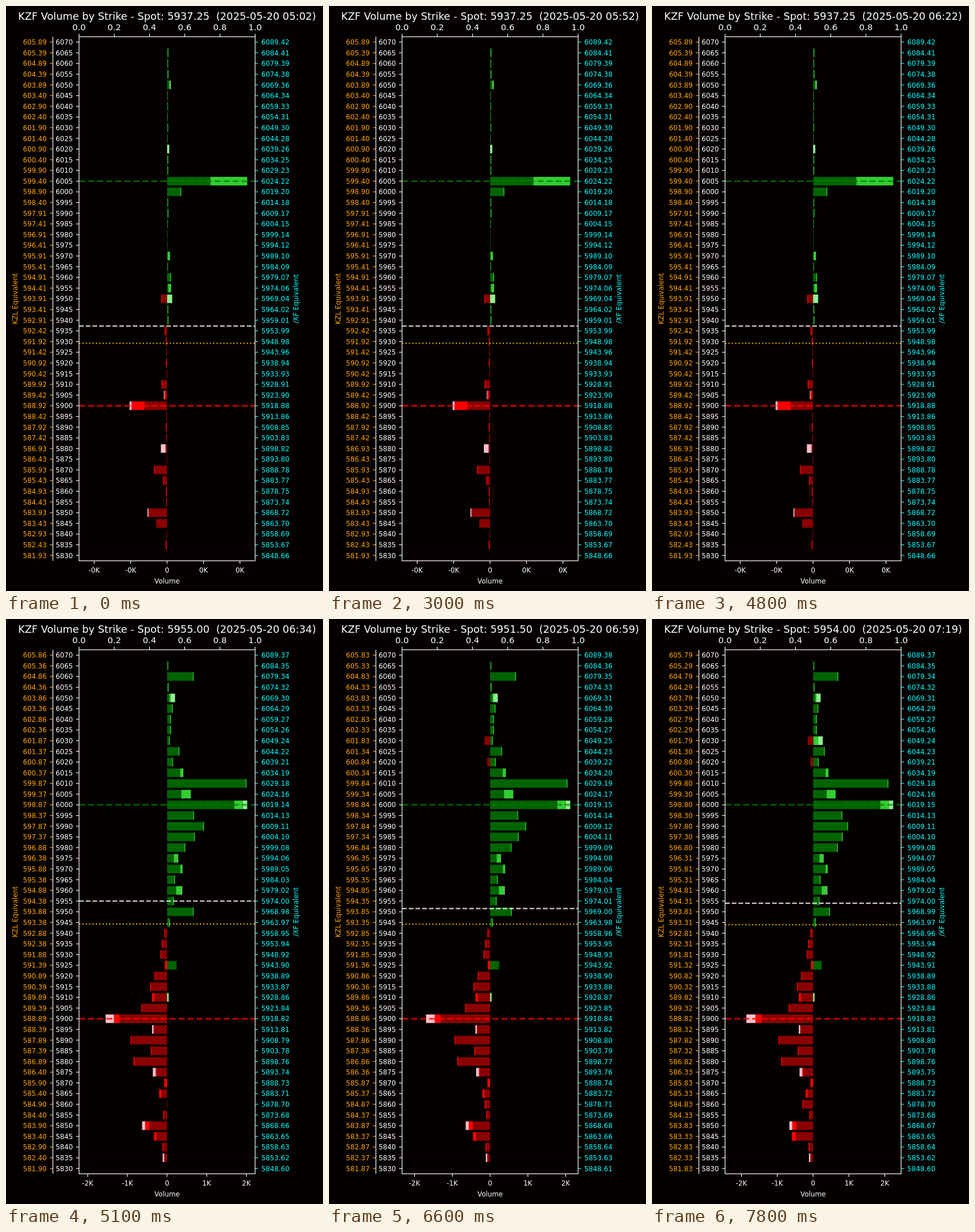
An HTML page for the animation above (8 s loop, 551x1017 px).

```html
<!DOCTYPE html>
<html lang="en">
<head>
<meta charset="utf-8">
<title>Volume by Strike</title>
<style>
  html, body { margin: 0; width: 100%; height: 100%; overflow: hidden; background: #050000; }
  svg { display: block; width: 551px; height: 1017px; }
  text { font: 11.83px "DejaVu Sans", Verdana, sans-serif; fill: #fff; white-space: pre; }
  .mid { text-anchor: middle; }
  .end { text-anchor: end; }
  .title { font-size: 17.75px; }
  .scale { font-size: 14.8px; }
  .etf { fill: #ffa500; }
  .fut { fill: #0ff; }
</style>
</head>
<body>
<svg id="stage" viewBox="0 0 551 1017"></svg>
<script>
const LOOP = 8000, STEP = 300, LAST = 26, OPEN = 17;
const LEFT = 127, RIGHT = 433, TOP = 53.5, BOTTOM = 964.5, ZERO = 280;
const HIGH = 6070, ROWS = 49, PITCH = (BOTTOM - TOP) / ROWS;
const LONGEST = 139.3, TICK = 100;
const GREENS = ["#006400", "#32cd32", "#90ee90"];
const REDS = ["#8b0000", "#ff0000", "#ffc0cb"];

// A bar is [strike, signed volume, dark share, bright share]; the rest is pale.
const earlyTrades = [
  [6050, 10, .6, .8], [6020, 6, 0, 0], [6005, 220, .54, 1], [6000, 39], [5970, 8, .2, 1],
  [5960, 11], [5955, 11, .3, 1], [5950, 14, 0, 0], [5950, -16], [5935, -7], [5910, -15],
  [5905, -9, .3, .8], [5900, -103, .6, .95], [5880, -17, .24, .24], [5870, -36],
  [5865, -11], [5850, -54, .93, .95], [5845, -30, 1, 1]
];
// Volume after the open, one value per strike from 6065 down.
const openVolume = [
  3, 67, 4, 20, 14, 10, 10, 7, 31, 15, 41, 200, 60, 202, 68, 93, 70, 46, 28, 39, 20, 38, 17, 67, 7,
  -7, -13, -17, -6, -32, -43, -38, -65, -155, -38, -92, -41, -85, -36, -7, -20, -1, -10, -63, -33, -12, -11
];
const shares = {
  6050: [.3, .45], 6015: [.8, 1], 6005: [.6, 1], 6000: [.84, .945], 5975: [.6, .94], 5970: [.85, 1],
  5960: [.6, .95], 5925: [0, 1], 5910: [.83, 1], 5900: [.77, .865], 5895: [.88, .9], 5875: [.73, .8],
  5870: [0, 1], 5865: [.7, 1], 5850: [.7, .88], 5845: [.8, 1], 5835: [.67, .67]
};
const growth = { 6000: 1.107, 5995: 1.2, 5985: 1.18, 5980: 1.5, 5950: .7, 5900: 1.2, 5860: 30, 5845: 1.8 };
// Trades on the other side, each with its first step.
const hedges = [
  [18, [6030, -15, 1, 1]], [18, [6020, -8, 1, 1]], [OPEN, [5925, 24, 1, 1]],
  [OPEN, [5910, 4, 0, 0]], [24, [6030, 27, .06, .53]]
];
const prices = [
  { at: OPEN, spot: 5955, etf: 594.38 }, { at: 19, spot: 5952.75, etf: 594.16 },
  { at: 22, spot: 5951.5, etf: 594 }, { at: LAST, spot: 5954, etf: 594.21 }
];

const stage = document.getElementById("stage");
const strikes = Array.from({ length: ROWS }, (_, i) => HIGH - 5 * i);
const yOf = strike => TOP + ((HIGH - strike) / 5 + .5) * PITCH;
const mix = (a, b, k) => a + (b - a) * k;
const noise = n => { const v = Math.abs(Math.sin(n * 12.9898) * 43758.5453); return v - Math.floor(v); };

function add(parent, tag, attrs, content) {
  const el = document.createElementNS("http://www.w3.org/2000/svg", tag);
  for (const name in attrs) el.setAttribute(name, attrs[name]);
  if (content !== undefined) el.textContent = content;
  parent.append(el);
  return el;
}
const label = (x, y, cls, content, more) => add(stage, "text", { x, y, class: cls, ...more }, content);
const line = (x1, y1, x2, y2, stroke = "#fff", more) =>
  add(stage, "line", { x1, y1, x2, y2, stroke, "stroke-width": 1.2, ...more });
const across = (color, width, dash, opacity) => line(LEFT, 0, RIGHT, 0, color, {
  "stroke-width": width, "stroke-dasharray": dash.map(d => d * width).join(" "), "stroke-opacity": opacity
});
function moveTo(el, strike) {
  for (const end of ["y1", "y2"]) el.setAttribute(end, yOf(strike));
}

line(LEFT, yOf(5835), RIGHT, yOf(5835), "#1c0000", { "stroke-width": 1 });
const barLayer = add(stage, "g", {});
const DASH = [3.7, 1.6];
const spotLine = across("#fff", 2.2, DASH, .8);
const flipLine = across("#ffd700", 2.2, [1, 1.65], .8);
const callLine = across("#008000", 2.96, DASH, .7);
const putLine = across("#ff0000", 2.96, DASH, .75);

const rows = strikes.map(strike => {
  const y = yOf(strike), base = y + 4.4;
  line(LEFT - 5.2, y, LEFT, y);
  line(76.3, y, 81.5, y, "#ffa500");
  line(RIGHT, y, RIGHT + 5.2, y, "#0ff");
  label(116.4, base, "end", strike);
  return { strike, etf: label(70.9, base, "etf end"), fut: label(443.8, base, "fut") };
});
for (let i = 0; i <= 5; i++) {
  const x = mix(LEFT, RIGHT, i / 5);
  line(x, TOP - 5.2, x, TOP);
  label(x, 41.6, "scale mid", (i / 5).toFixed(1));
}
const ticks = [-2, -1, 0, 1, 2].map(n => ({
  n, mark: line(ZERO, BOTTOM, ZERO, BOTTOM + 5.2), text: label(ZERO, 985.2, "mid")
}));
add(stage, "rect", { x: LEFT, y: TOP, width: RIGHT - LEFT, height: BOTTOM - TOP,
  fill: "none", stroke: "#fff", "stroke-width": 1.2 });
line(81.5, TOP, 81.5, BOTTOM);

const title = label(ZERO, 24.3, "title mid");
label(ZERO, 1003.8, "mid", "Volume");
label(0, 0, "etf mid", "KZL Equivalent", { transform: "translate(19.5 509) rotate(-90)" });
label(0, 0, "fut mid", "/XF Equivalent", { transform: "translate(507.5 509) rotate(-90)" });

function earlyState() {
  const spot = 5937.25;
  const quiet = strikes.slice(1, -1)
    .filter(strike => !earlyTrades.some(bar => bar[0] === strike))
    .map(strike => [strike, mix(1, 4, noise(strike)) * Math.sign(strike - spot)]);
  return { spot, etf: 592.64, flip: 5929.2, bars: [...earlyTrades, ...quiet] };
}

function liveState(step) {
  const i = Math.max(1, prices.findIndex(price => price.at >= step));
  const a = prices[i - 1], b = prices[i], k = (step - a.at) / (b.at - a.at);
  const traded = ((step - OPEN) / (LAST - OPEN)) ** 1.3;
  const bars = openVolume.map((volume, n) => {
    const strike = strikes[n + 1];
    return [strike, volume * mix(1, growth[strike] ?? 1.05, traded), ...(shares[strike] ?? [])];
  });
  for (const [first, bar] of hedges) if (step >= first) bars.push(bar);
  return {
    spot: Math.round(mix(a.spot, b.spot, k) * 4) / 4,
    etf: mix(a.etf, b.etf, k),
    flip: mix(5944.3, 5944, traded),
    bars
  };
}

function drawBar([strike, volume, dark, bright = 1], unit) {
  const size = Math.abs(volume) * unit, sign = Math.sign(volume);
  const colors = sign > 0 ? GREENS : REDS;
  const ends = [dark === undefined ? Math.max(size / 2, size - 1.5) : size * dark, size * bright, size];
  let from = 0;
  ends.forEach((to, i) => {
    if (to > from) add(barLayer, "rect", {
      x: sign > 0 ? ZERO + from : ZERO - to, y: yOf(strike) - PITCH * .4,
      width: to - from, height: PITCH * .8, fill: colors[i]
    });
    from = to;
  });
}

function clock(step) {
  const min = step < OPEN ? 302 + 5 * step : 394 + 5 * (step - OPEN);
  const two = n => String(n).padStart(2, "0");
  return two(Math.floor(min / 60)) + ":" + two(min % 60);
}

function draw(step) {
  const live = step >= OPEN, { spot, etf, flip, bars } = live ? liveState(step) : earlyState();
  const callWall = bars.reduce((a, b) => b[1] > a[1] ? b : a);
  const putWall = bars.reduce((a, b) => b[1] < a[1] ? b : a);
  const unit = LONGEST / callWall[1];

  title.textContent = `KZF Volume by Strike - Spot: ${spot.toFixed(2)}  (2025-05-20 ${clock(step)})`;
  barLayer.replaceChildren();
  for (const bar of bars) drawBar(bar, unit);
  moveTo(spotLine, spot);
  moveTo(flipLine, flip);
  moveTo(callLine, callWall[0]);
  moveTo(putLine, putWall[0]);
  for (const row of rows) {
    row.etf.textContent = (row.strike * etf / spot).toFixed(2);
    row.fut.textContent = (row.strike * (spot + 19) / spot).toFixed(2);
  }
  for (const { n, mark, text } of ticks) {
    const x = ZERO + n * TICK * unit;
    mark.setAttribute("x1", x);
    mark.setAttribute("x2", x);
    text.setAttribute("x", x);
    text.textContent = n === 0 ? "0" : (n < 0 ? "-" : "") + (live ? Math.abs(n) : 0) + "K";
  }
}

let shown = -1;
const start = performance.now();
function tick(now) {
  const step = Math.min(LAST, Math.floor(Math.max(0, now - start) % LOOP / STEP));
  if (step !== shown) draw(shown = step);
  requestAnimationFrame(tick);
}
tick(start);
</script>
</body>
</html>
```
